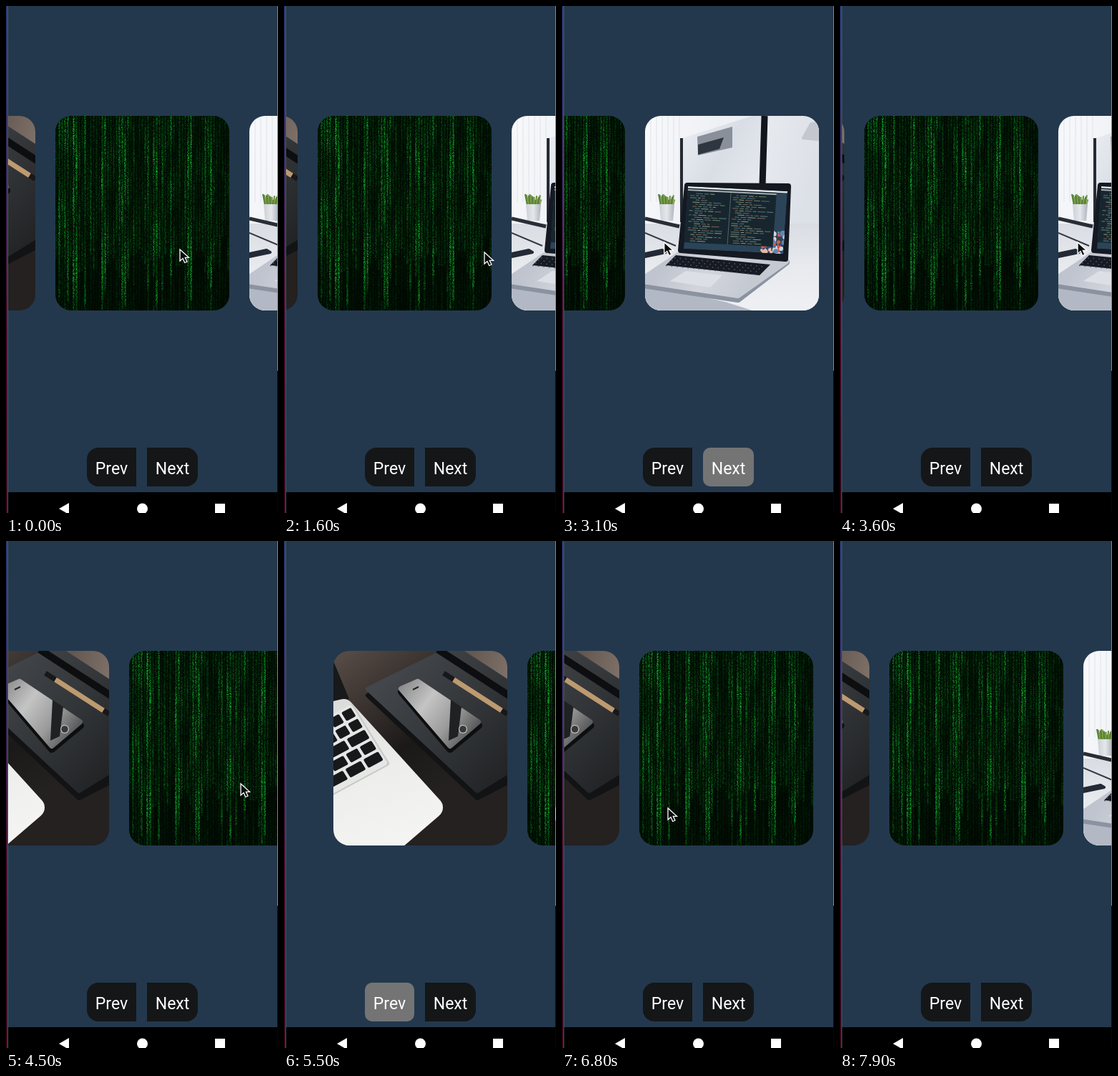
An HTML page with a canvas for the animation above (8000 ms loop, 380 by 706 pixels).

```html
<!DOCTYPE html>
<html lang="en">
<head>
<meta charset="utf-8">
<title>Card carousel</title>
<style>
html, body { margin: 0; width: 100%; height: 100%; overflow: hidden; background: #23384d; }
canvas { display: block; }
</style>
</head>
<body>
<canvas id="stage" width="380" height="706"></canvas>
<script>
const W = 380, H = 706, LOOP = 8000, STEP = 100;
const CARD = { w: 243, h: 271, x: 69, y: 153, r: 22, pitch: 271 };
const ctx = document.getElementById('stage').getContext('2d');

function random(seed) {
  return () => (seed = (seed * 16807) % 2147483647) / 2147483647;
}

const mix = (a, b, u) => a + (b - a) * u;

function ease(t, start, end) {
  const u = Math.min(Math.max((t - start) / (end - start), 0), 1);
  return u * u * (3 - 2 * u);
}

function rect(g, fill, x, y, w, h) {
  g.fillStyle = fill;
  g.fillRect(x, y, w, h);
}

// Filled polygon; a positive round grows it and softens its corners.
function poly(g, fill, pts, round = 0) {
  g.beginPath();
  for (let i = 0; i < pts.length; i += 2) g.lineTo(pts[i], pts[i + 1]);
  g.closePath();
  g.fillStyle = g.strokeStyle = fill;
  g.fill();
  if (!round) return;
  g.lineJoin = 'round';
  g.lineWidth = round * 2;
  g.stroke();
}

function line(g, color, width, x1, y1, x2, y2) {
  g.strokeStyle = color;
  g.lineWidth = width;
  g.beginPath();
  g.moveTo(x1, y1);
  g.lineTo(x2, y2);
  g.stroke();
}

function disc(g, fill, x, y, r) {
  g.fillStyle = fill;
  g.beginPath();
  g.arc(x, y, r, 0, Math.PI * 2);
  g.fill();
}

function grad(g, x1, y1, x2, y2, ...colors) {
  const s = g.createLinearGradient(x1, y1, x2, y2);
  colors.forEach((c, i) => s.addColorStop(i / (colors.length - 1), c));
  return s;
}

function roundRect(g, fill, x, y, w, h, r) {
  g.beginPath();
  g.roundRect(x, y, w, h, r);
  g.fillStyle = fill;
  g.fill();
}

// Each card is painted once and then only moved.
function makeCard(paint) {
  const c = document.createElement('canvas');
  c.width = CARD.w;
  c.height = CARD.h;
  const g = c.getContext('2d');
  g.beginPath();
  g.roundRect(0, 0, CARD.w, CARD.h, CARD.r);
  g.clip();
  paint(g);
  return c;
}

function paintRain(g) {
  const rnd = random(4711);
  rect(g, '#010702', 0, 0, CARD.w, CARD.h);
  for (let x = 0; x < CARD.w; x += 4) {
    const level = 0.3 + 0.75 * rnd() ** 2;
    const end = CARD.h * (0.5 + 0.2 * rnd() + 0.35 * level);
    const phase = rnd() * 6.3, wave = 0.02 + rnd() * 0.06;
    for (let y = 0; y < CARD.h; y++) {
      const streak = (0.75 + 0.3 * Math.sin(y * wave + phase)) * (y < end ? 1 : 0.4);
      for (let k = 0; k < 3; k++) {
        const a = level * streak * (0.2 + rnd() ** 2);
        rect(g, `rgba(12,156,38,${Math.min(a, 1).toFixed(3)})`, x + k, y, 1, 1);
      }
    }
  }
}

function paintDesk(g) {
  const rnd = random(23);
  rect(g, grad(g, 0, 0, 150, 200, '#5a4e48', '#3b3431', '#1b1918', '#242120'), 0, 0, CARD.w, CARD.h);
  rect(g, grad(g, 150, 0, 243, 30, '#51463f', '#7d7068'), 150, 0, 93, 60);

  // notebook with its strap and pen
  poly(g, '#121315', [48, 62, 160, 10, 250, 180, 201, 205], 3);
  poly(g, grad(g, 60, 50, 220, 200, '#43464a', '#34373a', '#212325'), [48, 53, 168, -6, 270, 60, 250, 165, 201, 195], 3);
  line(g, '#0d0e10', 10, 146, -2, 248, 64);
  line(g, '#17181a', 7, 154, 31, 243, 88);
  line(g, '#bd9a70', 7, 168, 40, 235, 83);

  // phone
  poly(g, '#0d0e10', [95, 57, 118, 45, 203, 104, 163, 137], 5);
  poly(g, grad(g, 94, 50, 195, 125, '#8d8d8d', '#c4c4c4', '#9b9b9b', '#4b4c4e'), [95, 53, 118, 43, 202, 99, 163, 132], 4);
  poly(g, '#202123', [164, 68, 179, 78, 174, 119, 161, 125]);
  line(g, '#222426', 2, 111, 54, 119, 50);
  disc(g, '#c9c5c0', 181, 109, 6);
  disc(g, '#37383a', 181, 109, 4.8);

  // laptop and keyboard
  poly(g, '#17191a', [0, 14, 22, 67, 0, 72]);
  poly(g, grad(g, 20, 70, 90, 270, '#dcdcdb', '#ededec', '#f4f4f3'), [-20, 90, 14, 82, 138, 218, 60, 285, -20, 285], 15);
  g.save();
  g.transform(0.88, -0.47, 0.53, 0.85, 26, 78);
  roundRect(g, '#c9c9c8', -200, -4, 203, 100, 4);
  roundRect(g, '#e6e6e5', -200, -4, 201, 98, 4);
  for (let y = 0; y < 90; y += 18) {
    for (let x = -2; x > -110;) {
      const w = 15 + rnd() * 16;
      roundRect(g, '#17181a', x - w, y, w, 14, 2);
      x -= w + 4;
    }
  }
  g.restore();
}

function paintOffice(g) {
  const rnd = random(92);
  rect(g, grad(g, 0, 0, CARD.w, 60, '#f8f9fb', '#eceff3', '#dce0e7'), 0, 0, CARD.w, CARD.h);
  for (let x = 8; x < 50; x += 8) line(g, '#dfe3e8', 1, x, 0, x, 120);

  // monitor and lamp
  poly(g, grad(g, 50, 20, 165, 90, '#e9ecf1', '#d9dee6', '#e6e9ee'), [49, 32, 150, 0, 166, 0, 163, 94, 50, 145]);
  poly(g, '#8a909a', [73, 29, 122, 15, 122, 44, 74, 55]);
  poly(g, '#30363f', [74, 40, 110, 30, 104, 46, 74, 54]);
  line(g, '#11151d', 9, 167, 0, 164, 96);
  line(g, '#252a33', 4, 51, 31, 51, 148);
  poly(g, '#c3c8d0', [221, 31, 232, 11, 243, 10, 243, 33], 2);

  // table
  rect(g, grad(g, 0, 150, 0, CARD.h, '#d9dde3', '#e8eaee', '#eff0f3'), 0, 150, CARD.w, 121);
  poly(g, '#b3b9c4', [0, 234, 112, 259, 150, 271, 0, 271]);

  // plant
  for (let i = 0; i < 15; i++) {
    line(g, ['#4d7d35', '#638c3c', '#8b9f4a'][i % 3], 2, 22 + i * 1.2, 125, 19 + i * 1.6, 109 + rnd() * 8);
  }
  poly(g, grad(g, 20, 0, 41, 0, '#cdd1d7', '#e5e7eb', '#adb3bd'), [20, 123, 41, 123, 39, 146, 22, 146]);

  // things on the table
  line(g, '#282d36', 5, 0, 143, 48, 154);
  line(g, '#343a45', 2, 0, 163, 43, 181);
  poly(g, '#242a35', [0, 192, 24, 187, 29, 190, 0, 196], 2);

  // laptop base and keys
  poly(g, '#8b92a0', [-9, 235, 46, 198, 198, 204, 130, 256], 4);
  poly(g, grad(g, 30, 200, 130, 260, '#bfc4ce', '#d2d5dc', '#c5c9d2'), [-9, 230, 46, 193, 198, 203, 130, 251], 3);
  poly(g, '#161a23', [43, 194, 175, 207, 160, 222, 29, 208]);
  for (let i = 0; i < 68; i++) {
    const row = i % 4, k = i >> 2;
    rect(g, '#525a69', 41 + k * 7.6 - row * 4, 197 + row * 3.6 + k * 0.75, 1.5, 1.5);
  }
  poly(g, '#dcdfe5', [57, 216, 108, 222, 91, 239, 35, 230]);

  // lid: a skewed screen with wallpaper and two panes of code
  poly(g, '#141922', [59, 97, 200, 98, 196, 199, 50, 187], 4);
  g.save();
  g.transform(1, 0.05, -0.07, 1, 60, 98);
  g.beginPath();
  g.rect(0, 0, 139, 87);
  g.clip();
  rect(g, '#2b4458', 0, 0, 139, 87);
  for (let i = 0; i < 70; i++) {
    const color = ['#d45d4b', '#e6b9ac', '#6287b0', '#304c82', '#cfd5de'][i % 5];
    disc(g, color, 108 + rnd() * 34, 58 + rnd() * 32, 1 + rnd() * 3);
  }
  rect(g, '#17262e', 0, 0, 124, 78);
  rect(g, '#e3e6e9', 0, 0, 139, 2.5);
  rect(g, '#a8b0b4', 0, 4, 124, 2);
  rect(g, '#52636c', 60, 6, 1, 72);
  const inks = ['#5d7f84', '#8d9683', '#85605b', '#6c8459', '#52707a'];
  for (let y = 9; y < 76; y += 3) {
    for (const left of [4, 64]) {
      let x = left + Math.floor(rnd() * 3) * 4;
      const end = left + 18 + rnd() * 34;
      for (let i = 0; x < end; i++) {
        const w = 3 + rnd() * 9;
        rect(g, inks[(i + y) % inks.length], x, y, w, 1);
        x += w + 2;
      }
    }
  }
  g.restore();
}

const cards = [paintDesk, paintRain, paintOffice].map(makeCard);

// The pointer drags from one x to another at height y; the row then settles on a page.
const swipes = [
  { grab: 1450, drop: 2200, page: 1, from: 302, to: 90, y: 343 },
  { grab: 2900, drop: 3600, page: 0, from: 96, to: 332, y: 329 },
  { grab: 4150, drop: 4500, page: -1, from: 225, to: 328, y: 338 },
  { grab: 6100, drop: 6800, page: 0, from: 380, to: 148, y: 372 }
];

function pose(t) {
  let row = CARD.x, x = 243, y = 339, free = 0;
  const reach = () => ease(t, free + 50, free + 500);
  for (const s of swipes) {
    const drag = ease(t, s.grab, s.drop);
    row = mix(row + (s.to - s.from) * drag, CARD.x - s.page * CARD.pitch, ease(t, s.drop, s.drop + 400));
    y = mix(y, s.y, reach());
    x = mix(mix(x, s.from, reach()), s.to, drag);
    free = s.drop;
  }
  return { row, x: mix(x, -20, reach()), y };
}

function button(label, x, w, disabled, corners) {
  roundRect(ctx, disabled ? '#747474' : '#151617', x, 615, w, 54, disabled ? 10 : corners);
  ctx.fillStyle = '#fff';
  ctx.font = '23px Roboto, sans-serif';
  ctx.textAlign = 'center';
  ctx.fillText(label, x + w / 2, 651.5);
}

function drawPointer(x, y) {
  ctx.save();
  ctx.translate(x, y);
  poly(ctx, '#080b0d', [0, 0, 0, 16, 4, 12.5, 6.7, 18.5, 10, 17, 7.3, 11.3, 12.5, 11.3]);
  ctx.strokeStyle = '#fff';
  ctx.lineWidth = 1.3;
  ctx.stroke();
  ctx.restore();
}

function draw(t) {
  const { row, x, y } = pose(t);
  rect(ctx, '#23384d', 0, 0, W, H);
  cards.forEach((c, i) => ctx.drawImage(c, Math.round(row + (i - 1) * CARD.pitch), CARD.y));

  const page = Math.round((CARD.x - row) / CARD.pitch);
  button('Prev', 113, 69, page === -1, [16, 0, 0, 16]);
  button('Next', 197, 71, page === 1, [0, 16, 16, 0]);

  rect(ctx, '#000', 2, 677, 377, 29);
  poly(ctx, '#fff', [74, 700, 88, 692, 88, 708]);
  disc(ctx, '#fff', 190.5, 700, 7.5);
  rect(ctx, '#fff', 292, 693, 14, 13);

  rect(ctx, grad(ctx, 0, 0, 0, H, '#293b73', '#37295a', '#490d2b', '#39091c'), 0, 0, 2, H);
  rect(ctx, '#4a5866', 2, 0, 1, H);
  rect(ctx, '#788591', 379, 0, 1, 508);
  rect(ctx, '#06090c', 379, 508, 1, H - 508);

  drawPointer(x, y);
}

function tick() {
  const t = (performance.now() + 5) % LOOP;
  draw(Math.floor(t / STEP) * STEP);
  requestAnimationFrame(tick);
}
tick();
</script>
</body>
</html>
```
